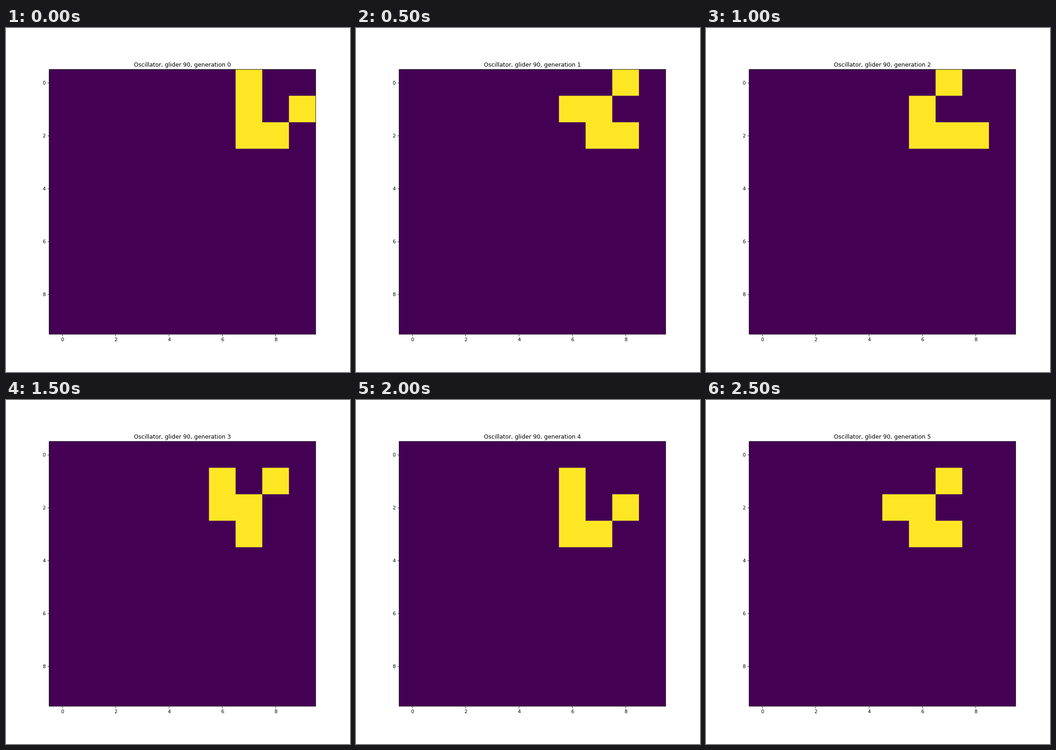
A matplotlib script for the animation above (3 s loop, 748x748 px).

```python
import numpy as np
import matplotlib.pyplot as plt
from matplotlib.animation import FuncAnimation
from matplotlib.patches import PathPatch, Rectangle
from matplotlib.path import Path
from matplotlib.transforms import Affine2D

SIZE = 10
GENERATIONS = 6
INCHES = 10
DPI = 74.8
DEAD, ALIVE = plt.get_cmap("viridis")([0.0, 1.0])

plt.style.use("default")


def step(grid):
    """Advance the Game of Life by one generation."""
    shifts = [(dy, dx) for dy in (-1, 0, 1) for dx in (-1, 0, 1) if dy or dx]
    around = sum(np.roll(grid, s, axis=(0, 1)) for s in shifts)
    return ((around == 3) | ((grid == 1) & (around == 2))).astype(int)


def outline(grid):
    """Join all live cells into one path, so that no seams show."""
    unit = Path.unit_rectangle()
    cells = [unit.transformed(Affine2D().translate(col - 0.5, row - 0.5))
             for row, col in np.argwhere(grid)]
    return Path.make_compound_path(*cells)


start = np.zeros((SIZE, SIZE), dtype=int)
for row, col in [(0, 7), (1, 7), (2, 7), (2, 8), (1, 9)]:
    start[row, col] = 1

history = [start]
while len(history) < GENERATIONS:
    history.append(step(history[-1]))

fig, ax = plt.subplots(figsize=(INCHES, INCHES), dpi=DPI)
ax.set(xlim=(-0.5, SIZE - 0.5), ylim=(SIZE - 0.5, -0.5),
       xticks=range(0, SIZE, 2), yticks=range(0, SIZE, 2))
ax.set_facecolor(DEAD)
ax.patch.set_snap(False)
title = ax.set_title("")

live = PathPatch(outline(start), facecolor=ALIVE, linewidth=0, snap=False)
ax.add_patch(live)

# The thin border sits half a line right of and below the plot's edge.
ax.spines[:].set_visible(False)
nudge = Affine2D().translate(0.37, -0.37)
ax.add_patch(Rectangle((0, 0), 1, 1, transform=ax.transAxes + nudge,
                       fill=False, edgecolor="black", linewidth=0.8,
                       snap=False, clip_on=False, zorder=2.5))


def draw(generation):
    live.set_path(outline(history[generation]))
    title.set_text(f"Oscillator, glider 90, generation {generation}")
    return live, title


anim = FuncAnimation(fig, draw, frames=GENERATIONS, interval=500,
                     repeat=True, repeat_delay=0, blit=False)
plt.show()
```
